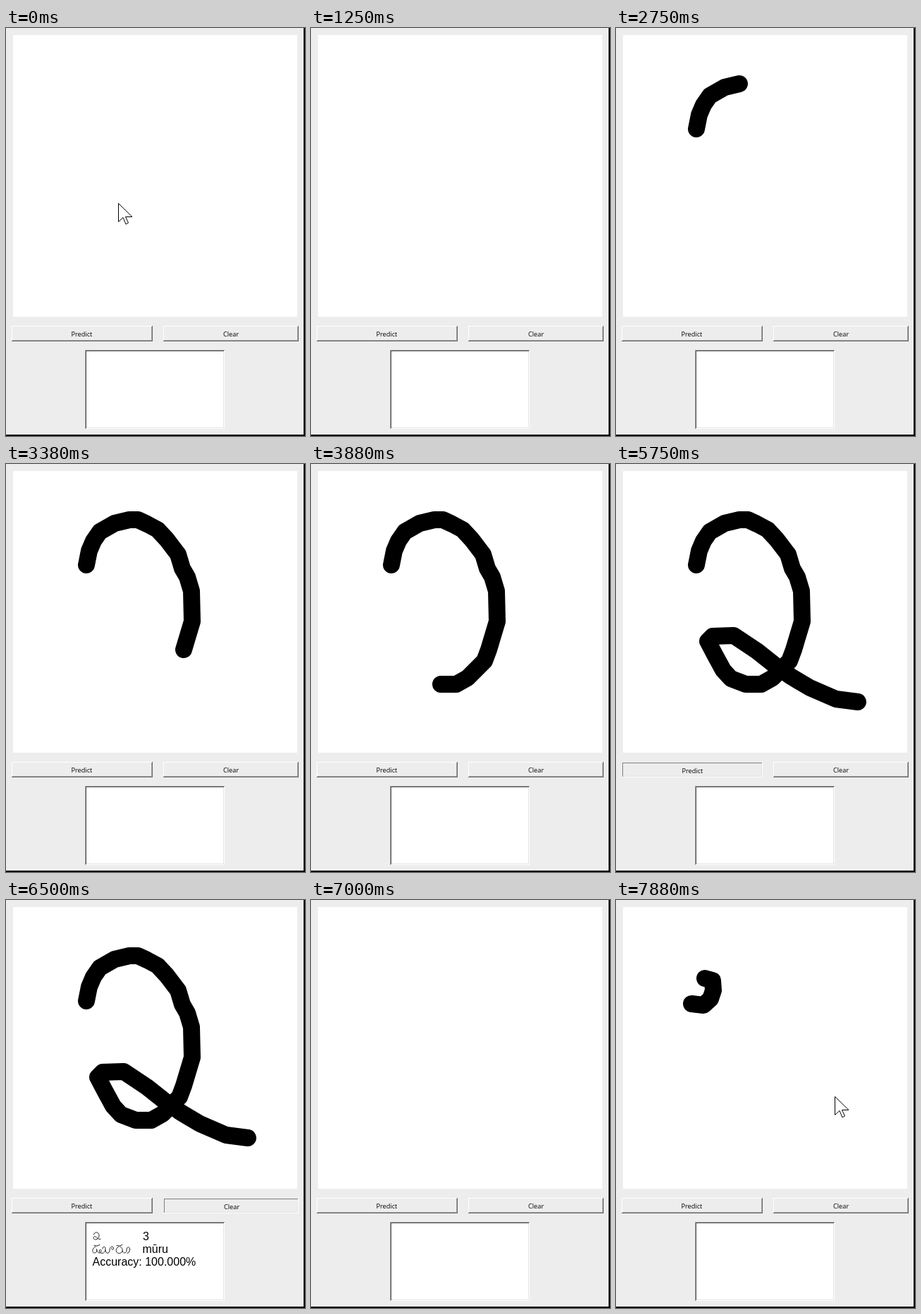
These frames come from a looping animation (424 px wide and 578 px high, 8 s). An HTML page:

```html
<!DOCTYPE html>
<html lang="en">
<head>
<meta charset="utf-8">
<title>Digit pad</title>
<style>
  html, body { margin: 0; width: 100%; height: 100%; overflow: hidden; background: #ededed; }
  div { position: absolute; box-sizing: border-box; }
  #frame { inset: 0; border: solid #000; border-width: 0 2px 2px 0; }
  #pad { left: 10px; top: 10px; width: 403px; height: 399px; background: #fff; }
  .button {
    top: 422px; height: 22px;
    box-shadow: inset -1px -1px #696969, inset 1px 1px #fff, inset -2px -2px #a0a0a0;
  }
  .button.down {
    box-shadow: inset -1px -1px #fff, inset 1px 1px #ededed, inset 2px 2px #808080, inset -2px -2px #e3e3e3;
  }
  #predict { left: 8px; width: 200px; }
  #clear { left: 223px; width: 192px; }
  #output {
    left: 112px; top: 456px; width: 198px; height: 112px; background: #fff;
    box-shadow: inset 1px 1px #a0a0a0, inset -1px -1px #fff, inset 2px 2px #505050, inset -2px -2px #e3e3e3;
  }
  svg { position: absolute; left: 0; top: 0; }
  .label { font: 9.2px "Open Sans", "Noto Sans", sans-serif; }
  .down-label { transform: translate(1px, 1px); }
  #result { font: 16px "Liberation Sans", Arial, sans-serif; }
  .stroke { fill: none; stroke: #000; stroke-width: 24; stroke-linecap: round; stroke-linejoin: round; }
  .glyph { fill: none; stroke: #222; stroke-width: 1; stroke-linecap: round; }
</style>
</head>
<body>
<div id="frame"></div>
<div id="pad"></div>
<div id="predict" class="button"></div>
<div id="clear" class="button"></div>
<div id="output"></div>
<svg width="424" height="578" viewBox="0 0 424 578">
  <polyline id="ink" class="stroke"/>
  <text id="predictLabel" class="label" x="92.5" y="436.5">Predict</text>
  <text id="clearLabel" class="label" x="308" y="436.5">Clear</text>
  <g id="result">
    <path class="glyph" role="img" aria-label="೩"
      d="M124.5 474C125 469.5 132 469.5 132 475.5C132 482 124 482.500 124 478.500C124 475.500 128 477 129 478.500Q131 481 134 480.500"/>
    <path class="glyph" role="img" aria-label="ಮೂರು"
      d="M125 489.500Q129 491.500 133 488.500M127 491C122 493 121.500 500 125.500 500C129 500 129 496 128.500 494.500C129 501 135 501.500 135 497
         C135 494 131.500 495 132.500 498C134 502 141 501 141 495C141 490 137 490 137 494M141 496C141 502 147 501.500 147 496
         C147 490 153 489.500 152.500 494C152 497 149 495 150 493M157 489.500Q161 491.500 165 488.500M160 491
         C154.500 493 155 500.500 160.500 500.500C166.500 500.500 166.500 493 162 491M165 497C167 502 171 500.500 171 496
         C171 490 176 490.500 175.500 496Q175 500 172 500.500"/>
    <text x="194" y="481.500">3</text>
    <text x="193.500" y="499.500">mūru</text>
    <text x="122.500" y="518">Accuracy: 100.000%</text>
  </g>
  <path id="cursor" d="M.5.5V26.500L7 20.500L11 30L14.500 28L10.500 19.500H20Z" fill="#fff" stroke="#000"/>
</svg>
<script>
const LOOP = 8000, TICK = 125;
const $ = id => document.getElementById(id);

// Each stroke grows by one group of points per tick.
const strokes = [
  { from: 19, until: 53, groups: [
    '114,143', '118,123', '124,109 133,96', '154,84 175,79', '187,79 200,85',
    '215,93 228,107', '244,128 250,148 257,160', '263,180 264,223', '252,263', '246,279',
    '236,289 222,303', '206,312', '184,312', '163,304 152,292', '140,270 130,251 137,244',
    '167,243', '200,265', '224,284', '248,301', '275,317 312,333', '343,337'] },
  { from: 60, until: 64, groups: ['126,111', '137,114 138,128', '134,140 124,149', '107,147'] }
];

// Cursor runs: ticks [from, until) and the positions at both ends.
const cursorRuns = [
  { from: 0, until: 5, start: [159, 248], end: [168, 252] },
  { from: 5, until: 9, start: [168, 252], end: [168, 252] },
  { from: 19, until: 21, start: [313, 358], end: [313, 358] },
  { from: 58, until: 60, start: [341, 330], end: [310, 278] },
  { from: 60, until: 64, start: [310, 278], end: [310, 278] }
];

const within = (tick, span) => tick >= span.from && tick < span.until;

function show(element, visible) {
  element.style.visibility = visible ? 'visible' : 'hidden';
}

function press(name, down) {
  $(name).classList.toggle('down', down);
  $(name + 'Label').classList.toggle('down-label', down);
}

function inkAt(tick) {
  const stroke = strokes.find(s => within(tick, s));
  if (!stroke) return '';
  const points = stroke.groups.slice(0, tick - stroke.from + 1).join(' ');
  return points.includes(' ') ? points : points + ' ' + points;
}

function moveCursor(tick) {
  const run = cursorRuns.find(r => within(tick, r));
  show($('cursor'), run);
  if (!run) return;
  const k = (tick - run.from) / (run.until - run.from);
  const [x, y] = run.start.map((a, i) => Math.round(a + (run.end[i] - a) * k));
  $('cursor').setAttribute('transform', `translate(${x} ${y})`);
}

let lastTick = -1;
function draw(now) {
  const tick = Math.floor(now % LOOP / TICK);
  if (tick !== lastTick) {
    lastTick = tick;
    $('ink').setAttribute('points', inkAt(tick));
    moveCursor(tick);
    press('predict', tick === 46 || tick === 47);
    press('clear', tick === 52);
    show($('result'), tick >= 48 && tick < 53);
  }
  requestAnimationFrame(draw);
}
draw(performance.now());
</script>
</body>
</html>
```
